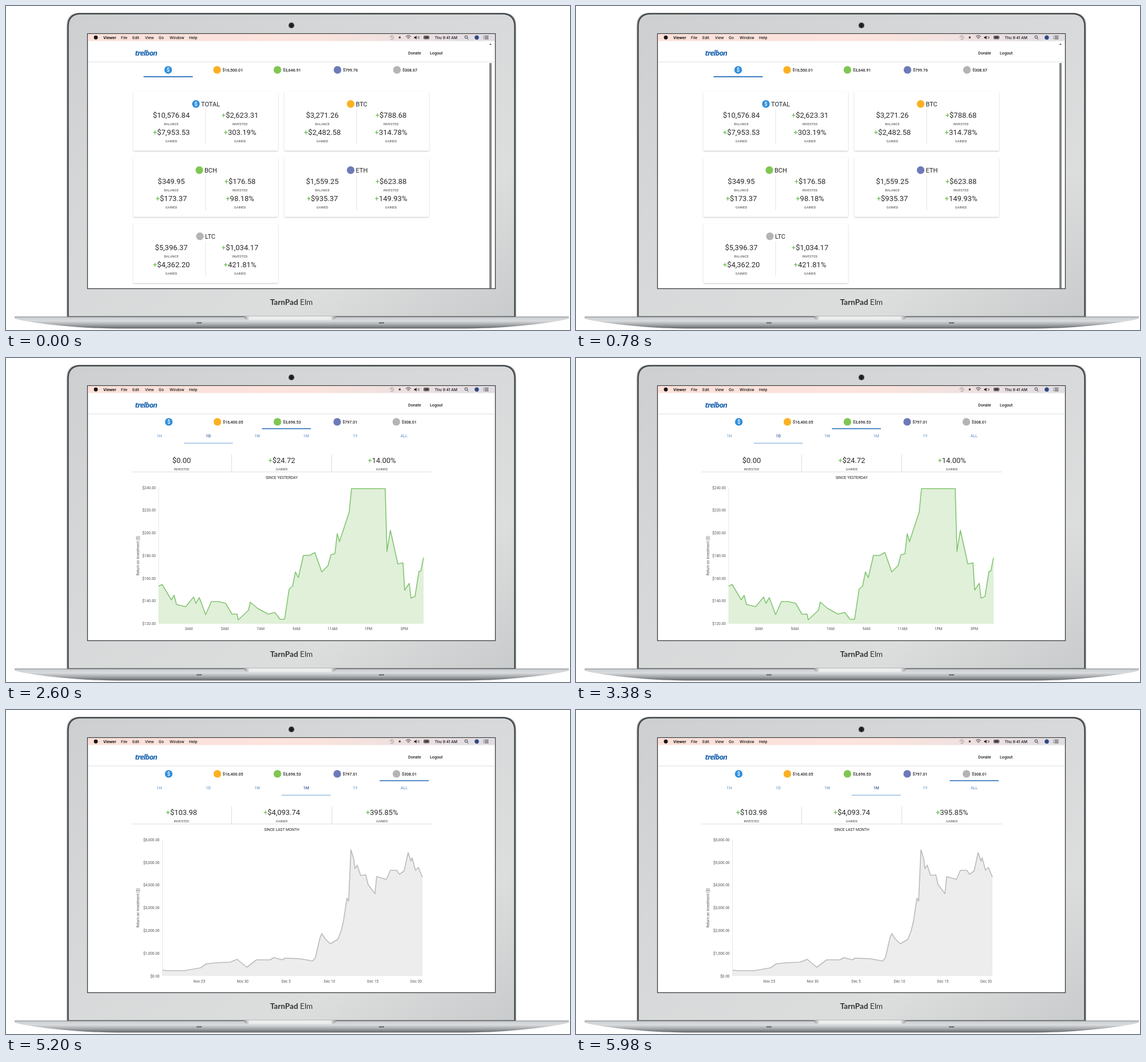
Write an HTML page that moves like this. It is 986 by 568 pixels and loops after 6.5 s.

```html
<!DOCTYPE html>
<html lang="en">
<head>
<meta charset="utf-8">
<title>Crypto portfolio on a laptop</title>
<style>
  html, body { margin: 0; width: 100%; height: 100%; overflow: hidden; background: #fff; }
  svg { display: block; width: 100vw; height: 100vh; font-family: Roboto, sans-serif; }
  .scene { visibility: hidden; animation: show 6.5s step-end infinite; }
  @keyframes show { 0% { visibility: visible; } 20%, 100% { visibility: hidden; } }
  .menu { font: 500 6.6px Inter, sans-serif; fill: #111; }
  .brand { font: italic 700 13px "Open Sans", sans-serif; letter-spacing: -.9px; fill: #1660ad; }
  .model { font: 400 13.6px Lato, sans-serif; fill: #333; }
  .link { font-size: 7.1px; font-weight: 500; fill: #222; }
  .range { font-size: 7px; fill: #4a86c4; }
  .range.on { fill: #2a5590; font-weight: 500; }
  .coin { font-size: 11px; fill: #222; }
  .value { font-size: 13px; fill: #2b2b2b; }
  .label { font-size: 5.8px; fill: #444; }
  .since { font-size: 6.7px; fill: #222; }
  .axis { font-size: 6.5px; fill: #555; }
  .plus { fill: #55b93f; }
  .mid { text-anchor: middle; }
  .end { text-anchor: end; }
</style>
</head>
<body>
<svg viewBox="0 0 986 568" preserveAspectRatio="none">
  <defs>
    <linearGradient id="metal" x1="0" y1="0" x2="1" y2="1">
      <stop offset="0" stop-color="#cdcfd0"/>
      <stop offset=".35" stop-color="#d6d7d8"/>
      <stop offset=".75" stop-color="#dcdddd"/>
      <stop offset="1" stop-color="#c9cbcc"/>
    </linearGradient>
    <linearGradient id="deck" x1="0" y1="0" x2="0" y2="1">
      <stop offset="0" stop-color="#c9cdd0"/>
      <stop offset=".35" stop-color="#d9dbdd"/>
      <stop offset=".65" stop-color="#a7abae"/>
      <stop offset="1" stop-color="#63676a"/>
    </linearGradient>
    <linearGradient id="notch">
      <stop offset="0" stop-color="#8d9093"/>
      <stop offset=".06" stop-color="#eceded"/>
      <stop offset=".94" stop-color="#eceded"/>
      <stop offset="1" stop-color="#8d9093"/>
    </linearGradient>
    <linearGradient id="bar">
      <stop offset="0" stop-color="#fbe0d9"/>
      <stop offset=".55" stop-color="#fbe3dd"/>
      <stop offset="1" stop-color="#dfdde3"/>
    </linearGradient>
    <filter id="lift" x="-5%" y="-5%" width="110%" height="115%">
      <feDropShadow dx="0" dy="1" stdDeviation="1" flood-opacity=".28"/>
    </filter>
  </defs>

  <!-- lid -->
  <path d="M106 546V35Q106 12 129 12H869Q892 12 892 35V546Z" fill="#aeb1b3"/>
  <path d="M108.5 545V36Q108.5 13.5 131 13.5H867Q889.5 13.5 889.5 36V545Z" fill="url(#metal)" stroke="#45494c" stroke-width="2.4"/>
  <circle cx="499" cy="34" r="5" fill="#2d2f31"/>
  <circle cx="499" cy="34" r="2" fill="#101114"/>
  <text class="model mid" x="499" y="523.5"><tspan font-weight="700">TarnPad</tspan> Elm</text>

  <!-- base -->
  <path d="M15 545H984V548Q960 555 895 561Q850 565.5 790 565.5H208Q148 565.5 103 561Q38 555 15 548Z" fill="url(#deck)"/>
  <path d="M15 545H984" stroke="#7d8184"/>
  <path d="M416 544H577Q576 550.5 568 550.5H425Q417 550.5 416 544Z" fill="url(#notch)"/>
  <path d="M333 555.5h9M652 555.5h9" stroke="#44484b" stroke-width="1.6"/>

  <!-- screen -->
  <rect x="142.5" y="48.5" width="713" height="447" fill="#fff" stroke="#3b3c3e" stroke-width="1.3"/>
  <rect x="143" y="49" width="712" height="12.5" fill="url(#bar)"/>
  <circle cx="157" cy="55.2" r="3.4" fill="#151515"/>
  <g class="menu" id="menu"></g>
  <g fill="none" stroke="#222" stroke-width=".9">
    <path d="M671 55.2a3.4 3.4 0 1 1 1.2 2.6M674 53v2.4h2" stroke="#777" stroke-width=".7"/>
    <path d="M699 53.6q4.5-4 9 0M700.7 55.3q2.8-2.5 5.6 0M702.3 57q1.2-1 2.4 0"/>
    <path d="M719.8 53.5q1.3 1.7 0 3.4M721.4 52.7q2 2.5 0 5" stroke-width=".7"/>
    <rect x="730.5" y="52.6" width="9" height="5" rx=".8"/>
    <circle cx="804.4" cy="54.4" r="2.3"/>
    <path d="M806 56.2l2.4 2.4"/>
    <path d="M834.5 52.8h9M834.5 55.2h9M834.5 57.6h9" stroke-dasharray="1 1.3 6.7"/>
  </g>
  <path d="M713.5 54h1.6l2.6-2v6.4l-2.6-2h-1.6zM731.5 53.6h7v3h-7z" fill="#222"/>
  <rect x="686.8" y="53.6" width="3" height="3" fill="#333"/>
  <circle cx="823" cy="55.3" r="3.7" fill="#2f4a82"/>

  <!-- page header -->
  <text class="brand" x="225.5" y="87">trelbon</text>
  <text class="link" x="703" y="85">Donate</text>
  <text class="link" x="741" y="85">Logout</text>
  <path d="M143 98H855" stroke="#dedede"/>
  <g id="scenes"></g>
</svg>

<script>
const COINS = ['#2f8edb', '#fcb022', '#80c653', '#6d7ab9', '#b4b4b4'];
const RANGES = ['1H', '1D', '1W', '1M', '1Y', 'ALL'];
const PRICES = ['$16,400.05', '$3,696.53', '$797.01', '$308.01'];
const scenes = document.getElementById('scenes');

const text = (cls, x, y, s, extra = '') => `<text class="${cls}" x="${x}" y="${y}" ${extra}>${s}</text>`;
const line = (x1, y1, x2, y2, color = '#ddd', w = 1) =>
  `<path d="M${x1} ${y1}L${x2} ${y2}" stroke="${color}" stroke-width="${w}"/>`;
const plus = s => s.replace('+', '<tspan class="plus">+</tspan>');
const times = (n, fn) => Array.from({ length: n }, (_, i) => fn(i));
const money = n => '$' + n.toLocaleString('en-US', { minimumFractionDigits: 2 });

function addScene(content) {
  const delay = (scenes.childElementCount * 1.3 - 6.5).toFixed(1);
  scenes.insertAdjacentHTML('beforeend', `<g class="scene" style="animation-delay:${delay}s">${content}</g>`);
}

function coin(i, x, y) {
  const sign = i ? '' : text('mid', x, y + 3.4, '$', 'font-size="9.5" font-weight="500" fill="#fff"');
  return `<circle cx="${x}" cy="${y}" r="6.7" fill="${COINS[i]}"/>${sign}`;
}

function coinTabs(prices, active) {
  const tab = i => {
    const x = 283.5 + i * 105 - (i === 1 ? 19.5 : i ? 19 + (i === 4 ? 1 : 0) : 0);
    return coin(i, x, 112) + (i ? text('link', x + 9.4, 114.6, prices[i - 1]) : '');
  };
  const from = 240.5 + 103.4 * active;
  return times(5, tab).join('') + line(from, 124, from + 86, 124, '#3f7cc0', 1.8);
}

function stat(x, y, value, label) {
  return text('value mid', x, y + 4.6, plus(value)) + text('label mid', x, y + 18, label);
}

function card(i, name, titleX, balance, invested, gained, percent) {
  const x = 222.5 + (i % 2) * 264, y = 150 + Math.floor(i / 2) * 116;
  return `<rect x="${x}" y="${y}" width="253" height="103.5" rx="1.5" fill="#fff" filter="url(#lift)"/>`
    + coin(i, titleX, y + 21.8) + text('coin', titleX + 9, y + 26, name)
    + line(x + 126.5, y + 31, x + 126.5, y + 92, '#e2e2e2')
    + stat(x + 66.5, y + 41, balance, 'BALANCE') + stat(x + 186.5, y + 41, invested, 'INVESTED')
    + stat(x + 66.5, y + 71, gained, 'GAINED') + stat(x + 186.5, y + 71, percent, 'GAINED');
}

// Everything above the chart, laid out at full size and scaled per page
function summary(p) {
  const under = 224 + 86 * p.range;
  return coinTabs(PRICES, p.coin)
    + RANGES.map((r, i) => text('range mid' + (i === p.range ? ' on' : ''), 267 + 86 * i, 139.5, r)).join('')
    + line(under, 149.5, under + 86, 149.5, '#6d9fd2', 1.2)
    + p.values.map((v, i) => stat(306 + 176 * i, 179.5, v, i ? p.result : 'INVESTED')).join('')
    + line(394, 169.5, 394, 200) + line(570, 169.5, 570, 200) + line(218, 200.3, 746, 200.3)
    + text('since mid', 482, 212.3, p.since);
}

function chart({ k, left, max, step, rows, labels, first, pitch, stroke, fill, curve }) {
  const top = 100 + 128 * k, bottom = 100 + 368 * k;
  const gap = (bottom - top) / rows;
  return times(rows + 1, i => text('axis end', left - 5, top + i * gap + 2.3, money(max - i * step))).join('')
    + labels.map((s, i) => text('axis mid', first + i * pitch, bottom + 11.2, s)).join('')
    + text('axis mid', 0, 0, 'Return on investment ($)',
        `transform="translate(${232 + (1 - k) * 250} ${(top + bottom) / 2}) rotate(-90)" style="font-size:6.3px"`)
    + line(left, top, left, bottom, '#e6e6e6')
    + `<path d="${curve}V${bottom}H${left}Z" fill="${fill}"/>`
    + `<path d="${curve}" fill="none" stroke="${stroke}" stroke-width="1.6" stroke-linejoin="round"/>`;
}

function addChart(p) {
  const fit = `translate(482 100) scale(${p.k}) translate(-482 -100)`;
  addScene(`<g transform="${fit}">${summary(p)}</g>` + chart(p));
}

function clock(i) {
  const m = 37 + i * 5;
  return `${3 + Math.floor(m / 60)}:${String(m % 60).padStart(2, '0')} pm`;
}

addScene(coinTabs(['$16,500.01', '$3,646.91', '$799.76', '$308.67'], 0)
  + card(0, 'TOTAL', 332, '$10,576.84', '+$2,623.31', '+$7,953.53', '+303.19%')
  + card(1, 'BTC', 602.5, '$3,271.26', '+$788.68', '+$2,482.58', '+314.78%')
  + card(2, 'BCH', 338, '$349.95', '+$176.58', '+$173.37', '+98.18%')
  + card(3, 'ETH', 602.5, '$1,559.25', '+$623.88', '+$935.37', '+149.93%')
  + card(4, 'LTC', 339, '$5,396.37', '+$1,034.17', '+$4,362.20', '+421.81%')
  + line(847, 100, 847, 495, '#858585', 4)
  + '<path d="M845 68l2-2.4 2 2.4z" fill="#555"/>');

addChart({
  coin: 1, range: 0, k: 1, since: 'IN THE PAST HOUR', result: 'LOST',
  values: ['$0.00', '-$65.22', '-8.27%'],
  left: 272, max: 2560, step: 10, rows: 10,
  labels: times(12, clock), first: 307, pitch: 37.9,
  stroke: '#fcb321', fill: '#ffeac8',
  curve: 'M272 304 278 318H290L291 311 300 315 307 318H355L357 295 364 277H368L369 247H375L377 262 389 272 401 282 402 339 404 281H422L424 288 429 281H436L442 293 459 300 475 297H488L495 318H497L499 346 505 365H516L518 361H544L546 365H609L610 347 614 329H623L633 341H638L645 357H672L685 382H697L701 410 708 406 718 414H722L723 450 725 434 727 462'
});

addChart({
  coin: 2, range: 1, k: .9945, since: 'SINCE YESTERDAY', result: 'GAINED',
  values: ['$0.00', '+$24.72', '+14.00%'],
  left: 267, max: 240, step: 20, rows: 6,
  labels: ['3AM', '5AM', '7AM', '9AM', '11AM', '1PM', '3PM'], first: 319.5, pitch: 62.8,
  stroke: '#83c572', fill: '#e0f0d9',
  curve: 'M267 400 273 397 289 424 294 416 298 432 314 436 328 419 332 430 338 420 349 450 359 427H371L384 430 395 449H404L406 459 424 442 427 428 440 439 458 449 470 446 479 458H487L495 405 501 400 506 375 511 385 520 346H531L540 341 552 375 563 364 568 345 575 343 579 308 583 322 600 270 604 229H663L666 339 672 302 685 361 694 359 697 407 705 395 708 421 715 418 722 374H725L730 350'
});

addChart({
  coin: 3, range: 2, k: .985, since: 'SINCE LAST WEEK', result: 'GAINED',
  values: ['$0.00', '+$105.85', '+16.97%'],
  left: 275, max: 1100, step: 50, rows: 10,
  labels: times(13, i => i % 2 ? '2AM' : '2PM'), first: 308, pitch: 34.4,
  stroke: '#7080b8', fill: '#e3e6f1',
  curve: 'M275 356 278 363 284 350 289 371 292 369 297 414 300 399 308 413 313 394 322 394 330 440 334 423 347 428 352 447 358 445 367 404 378 409 392 402 397 378 412 404 428 383 438 405 453 397 473 370 498 378 512 373 523 356 533 391 538 380 552 381 563 354 570 375 581 360 583 338 593 309 600 320 606 293 625 248 629 286 638 255 642 277 652 258 660 308 665 282 669 349 674 294 686 329 703 276 714 320 717 297 725 294 728 305'
});

addChart({
  coin: 4, range: 3, k: .9955, since: 'SINCE LAST MONTH', result: 'GAINED',
  values: ['+$103.98', '+$4,093.74', '+395.85%'],
  left: 273.5, max: 6000, step: 1000, rows: 6,
  labels: ['Nov 25', 'Nov 30', 'Dec 5', 'Dec 10', 'Dec 15', 'Dec 20'], first: 338, pitch: 75.8,
  stroke: '#bababa', fill: '#ededed',
  curve: 'M274 456 283 457 311 457 340 452 350 445 369 443 392 442 404 437 421 451 438 438 462 438 468 434 483 438 488 435 514 436 536 440 541 434 549 399 552 392 558 401 567 410 580 402 586 387 590 370 596 330 599 335 603 245 608 261 610 278 614 272 620 290 629 289 633 306 645 322 648 292 665 297 672 281 683 281 688 288 696 282 703 250 708 265 710 259 716 281 721 276 728 293'
});

const menu = { Viewer: 170, File: 201, Edit: 221, View: 243, Go: 267, Window: 286, Help: 320, 'Thu 9:41 AM': 749.5 };
document.getElementById('menu').innerHTML = Object.entries(menu).map(([s, x], i) =>
  text('', x, 57.6, s, i ? '' : 'font-weight="700"')).join('');
</script>
</body>
</html>
```
